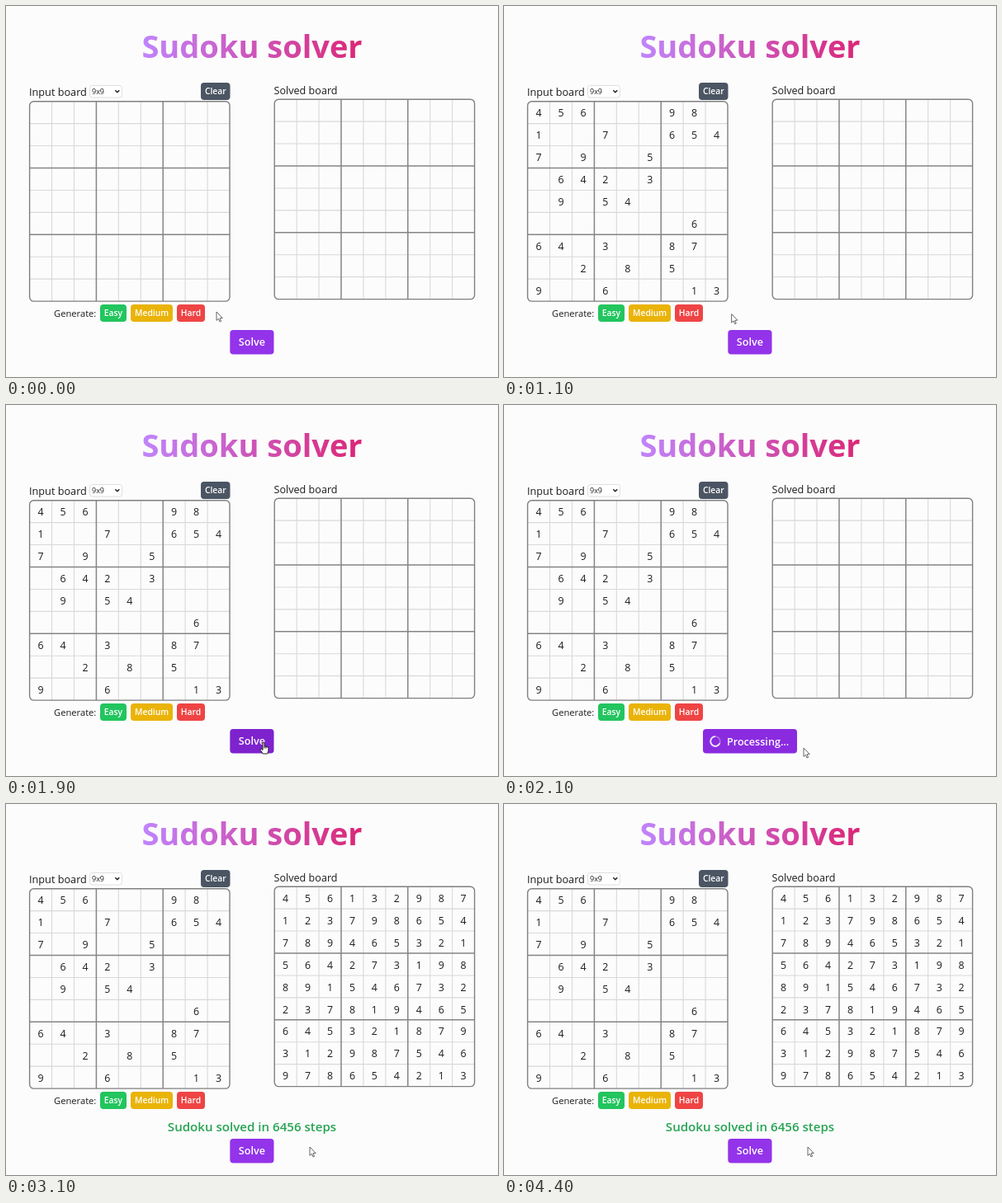
Animation of 596 by 450 pixels, one loop 5500 ms. Source, as an HTML page with a canvas:

```html
<!DOCTYPE html>
<html lang="en">
<head>
<meta charset="utf-8">
<title>Sudoku solver</title>
<style>
html, body { margin: 0; width: 100%; height: 100%; overflow: hidden; background: #fcfcfc; }
canvas { display: block; width: 596px; height: 450px; }
</style>
</head>
<body>
<canvas id="stage" width="596" height="450"></canvas>
<script>
const ctx = document.getElementById('stage').getContext('2d');
const FONT = '"Open Sans", "Noto Sans", sans-serif';
const LOOP = 5500, TICK = 100;
const GENERATED = 900, PROCESSING = 2000, SOLVED = 2200;

const puzzle = ['456...98.', '1..7..654', '7.9..5...', '.642.3...', '.9.54....',
  '.......6.', '64.3..87.', '..2.8.5..', '9..6...13'];
const solution = ['456132987', '123798654', '789465321', '564273198', '891546732',
  '237819465', '645321879', '312987546', '978654213'];

// Pointer stops: time, x, y
const path = [[0, 255, 371], [100, 255, 371], [500, 233, 371], [900, 233, 371],
  [1200, 297, 375], [1500, 340, 392], [1800, 312, 409], [1900, 312, 409],
  [2100, 363, 416], [2200, 368, 416], [LOOP, 368, 416]];

function pointerAt(t) {
  const i = path.findIndex((p, n) => n > 0 && t <= p[0]);
  const [t0, x0, y0] = path[i - 1], [t1, x1, y1] = path[i];
  const k = (t - t0) / (t1 - t0);
  return { x: x0 + (x1 - x0) * k, y: y0 + (y1 - y0) * k };
}

function text(str, x, y, size, { color = '#1c1c1c', weight = 400, align = 'left' } = {}) {
  ctx.font = `${weight} ${size}px ${FONT}`;
  ctx.textAlign = align;
  ctx.fillStyle = color;
  ctx.fillText(str, x, y);
}

function box(x, y, w, h, r) {
  ctx.beginPath();
  ctx.roundRect(x, y, w, h, r);
}

function button(label, x, y, w, h, color, size = 10.3) {
  box(x, y, w, h, 4);
  ctx.fillStyle = color;
  ctx.fill();
  text(label, x + w / 2, y + h / 2 + size * 0.37, size,
    { color: '#fff', weight: 600, align: 'center' });
}

function line(x0, y0, x1, y1) {
  ctx.beginPath();
  ctx.moveTo(x0, y0);
  ctx.lineTo(x1, y1);
  ctx.stroke();
}

function board(x, y, rows) {
  const side = 242.4, cell = side / 9;
  for (const bold of [false, true]) {
    ctx.strokeStyle = bold ? '#858585' : '#d9d9d9';
    ctx.lineWidth = bold ? 1.5 : 1.1;
    for (let i = 1; i < 9; i++) {
      if ((i % 3 === 0) !== bold) continue;
      const d = i * cell;
      line(x + d, y, x + d, y + side);
      line(x, y + d, x + side, y + d);
    }
  }
  ctx.strokeStyle = '#808080';
  ctx.lineWidth = 1.4;
  box(x, y, side, side, 5);
  ctx.stroke();
  if (!rows) return;
  rows.forEach((row, r) => [...row].forEach((digit, c) => {
    if (digit !== '.') {
      text(digit, x + (c + 0.5) * cell, y + (r + 0.5) * cell + 5.2, 12.4, { align: 'center' });
    }
  }));
}

function title() {
  const fade = ctx.createLinearGradient(166, 0, 430, 0);
  fade.addColorStop(0, '#c084fc');
  fade.addColorStop(1, '#db2777');
  text('Sudoku solver', 298, 63, 38, { color: fade, weight: 700, align: 'center' });
}

function select() {
  box(101.5, 96.5, 39, 14.5, 3);
  ctx.fillStyle = '#fff';
  ctx.fill();
  ctx.strokeStyle = '#dedfe2';
  ctx.lineWidth = 1;
  ctx.stroke();
  text('9x9', 104, 107.3, 9);
  ctx.strokeStyle = '#222';
  ctx.lineWidth = 1.4;
  ctx.beginPath();
  ctx.moveTo(132.3, 102.2);
  ctx.lineTo(134.8, 104.8);
  ctx.lineTo(137.3, 102.2);
  ctx.stroke();
}

function spinner(t) {
  const turn = (t - 2100) / 1000 * Math.PI * 2;
  const arc = (color, from, to) => {
    ctx.strokeStyle = color;
    ctx.beginPath();
    ctx.arc(256, 408, 5.8, from, to);
    ctx.stroke();
  };
  ctx.lineWidth = 1.8;
  arc('rgba(255,255,255,.3)', 0, Math.PI * 2);
  arc('#efe2fc', turn + 0.4, turn + 4.7);
}

function outline(points, x, y) {
  ctx.beginPath();
  points.forEach(([dx, dy]) => ctx.lineTo(x + dx, y + dy));
  ctx.closePath();
  ctx.fillStyle = '#fff';
  ctx.fill();
  ctx.stroke();
}

const arrow = [[0, 0], [0, 10.4], [2.4, 8.3], [4, 12], [5.6, 11.3], [4, 7.7], [7.2, 7.5]];
const hand = [[-1, 0.6], [0, 0], [1, 0.6], [1, 5], [3, 5.2], [5, 6], [6, 7.2], [5.8, 10.5],
  [4.7, 14], [-0.8, 14], [-4, 9.2], [-3.6, 8], [-2.5, 8.2], [-1, 9.6]];

function pointer({ x, y }, over) {
  ctx.lineJoin = 'round';
  ctx.lineWidth = over ? 1 : 0.9;
  ctx.strokeStyle = over ? '#222' : '#555';
  outline(over ? hand : arrow, x, y);
  if (!over) return;
  line(x + 1, y + 5, x + 1, y + 7.5);
  line(x + 3, y + 5.4, x + 3, y + 7.7);
}

const inside = (p, x, y, w, h) => p.x >= x && p.x <= x + w && p.y >= y && p.y <= y + h;

function draw(t) {
  const done = t >= SOLVED, busy = t >= PROCESSING && !done;
  const shift = done ? 13 : 0;
  const p = pointerAt(t);
  const overHard = inside(p, 207, 362 - shift, 34, 21);
  const run = busy ? [241, 393, 114, 29.5] : [271.3, 393 + shift, 53.2, 29.5];
  const overRun = inside(p, ...run);

  ctx.fillStyle = '#fcfcfc';
  ctx.fillRect(0, 0, 596, 450);

  ctx.save();
  ctx.translate(0, -shift);
  title();
  text('Input board', 28, 108.6, 12.7);
  select();
  button('Clear', 236, 93, 35.5, 21, '#4b5563');
  board(28.6, 115.7, t >= GENERATED ? puzzle : null);
  text('Solved board', 324.5, 107.2, 12.6);
  board(325.2, 113.2, done ? solution : null);
  text('Generate:', 58, 377.2, 11.2);
  button('Easy', 114, 362, 32, 21, '#22c55e');
  button('Medium', 151, 362, 51, 21, '#eab308');
  button('Hard', 207, 362, 34, 21, overHard ? '#dc2626' : '#ef4444');
  ctx.restore();

  if (done) {
    text('Sudoku solved in 6456 steps', 298, 397, 15.1,
      { color: '#27a353', weight: 600, align: 'center' });
  }
  if (busy) {
    button('', ...run, '#8a2be0');
    spinner(t);
    text('Processing...', 270, 412.7, 12.6, { color: '#fff', weight: 600 });
  } else {
    button('Solve', ...run, overRun ? '#7e22ce' : '#9333ea', 12.6);
  }
  pointer(p, overHard || overRun);
}

const start = performance.now();
function frame() {
  const t = (performance.now() - start) % LOOP;
  draw(Math.floor(t / TICK) * TICK);
  requestAnimationFrame(frame);
}
frame();
</script>
</body>
</html>
```
